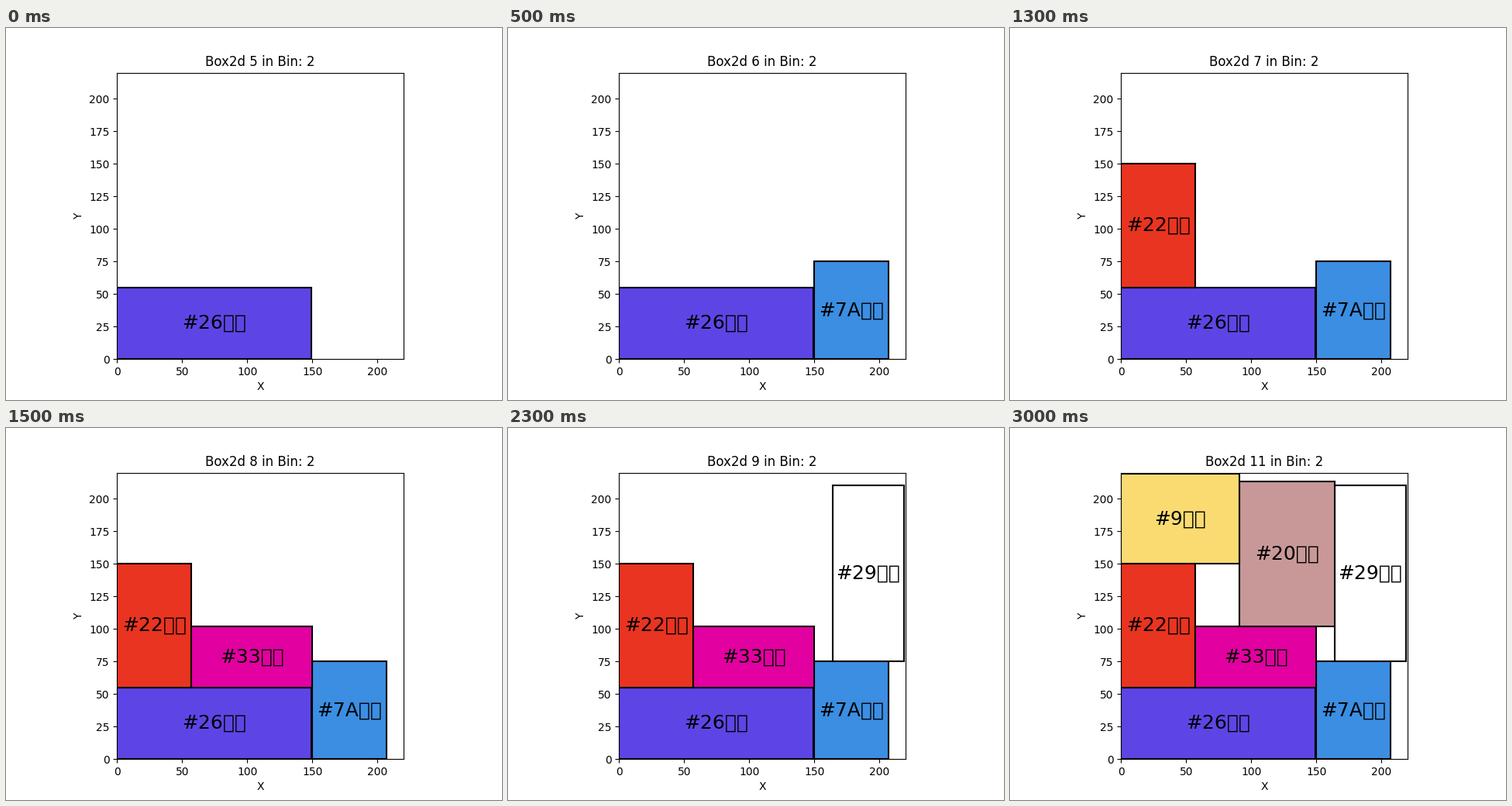
A matplotlib script that plays this animation: 640x480 px, repeating every 3500 ms.

```python
import matplotlib.pyplot as plt
from matplotlib.animation import FuncAnimation
from matplotlib.patches import Rectangle

plt.rcParams["font.family"] = "DejaVu Sans"

SIZE = 220
FIRST_BOX = 5
# The font has no CJK glyphs, so these show as empty boxes.
SUFFIX = "\u6728\u677f"

# label, x, y, width, height, colour
BOXES = [
    ("26", 0, 0, 149, 55, "#5D45E5"),
    ("7A", 150, 0, 57, 75, "#3B8EE2"),
    ("22", 0, 55, 57, 95, "#E93421"),
    ("33", 57, 55, 93, 47, "#E200A0"),
    ("29", 164, 75, 55, 135, "#FFFFFF"),
    ("20", 91, 102, 73, 111, "#C89898"),
    ("9", 0, 150, 91, 69, "#F9DB72"),
]

fig, ax = plt.subplots(figsize=(6.4, 4.8), dpi=100)
ax.set_xlim(0, SIZE)
ax.set_ylim(0, SIZE)
ax.set_aspect("equal")
ax.set_xticks(range(0, SIZE, 50))
ax.set_yticks(range(0, SIZE, 25))
ax.set_xlabel("X")
ax.set_ylabel("Y")
title = ax.set_title("")


def add_box(name, x, y, w, h, color):
    patch = ax.add_patch(
        Rectangle((x, y), w, h, facecolor=color, edgecolor="black", lw=1.5))
    label = ax.text(x + w / 2, y + h / 2, f"#{name}{SUFFIX}",
                    fontsize=18, ha="center", va="center")
    return patch, label


items = [add_box(*box) for box in BOXES]


def update(step):
    for i, pair in enumerate(items):
        for artist in pair:
            artist.set_visible(i <= step)
    title.set_text(f"Box2d {FIRST_BOX + step} in Bin: 2")


anim = FuncAnimation(fig, update, frames=len(BOXES), interval=500,
                     repeat=True, repeat_delay=0)
plt.show()
```
